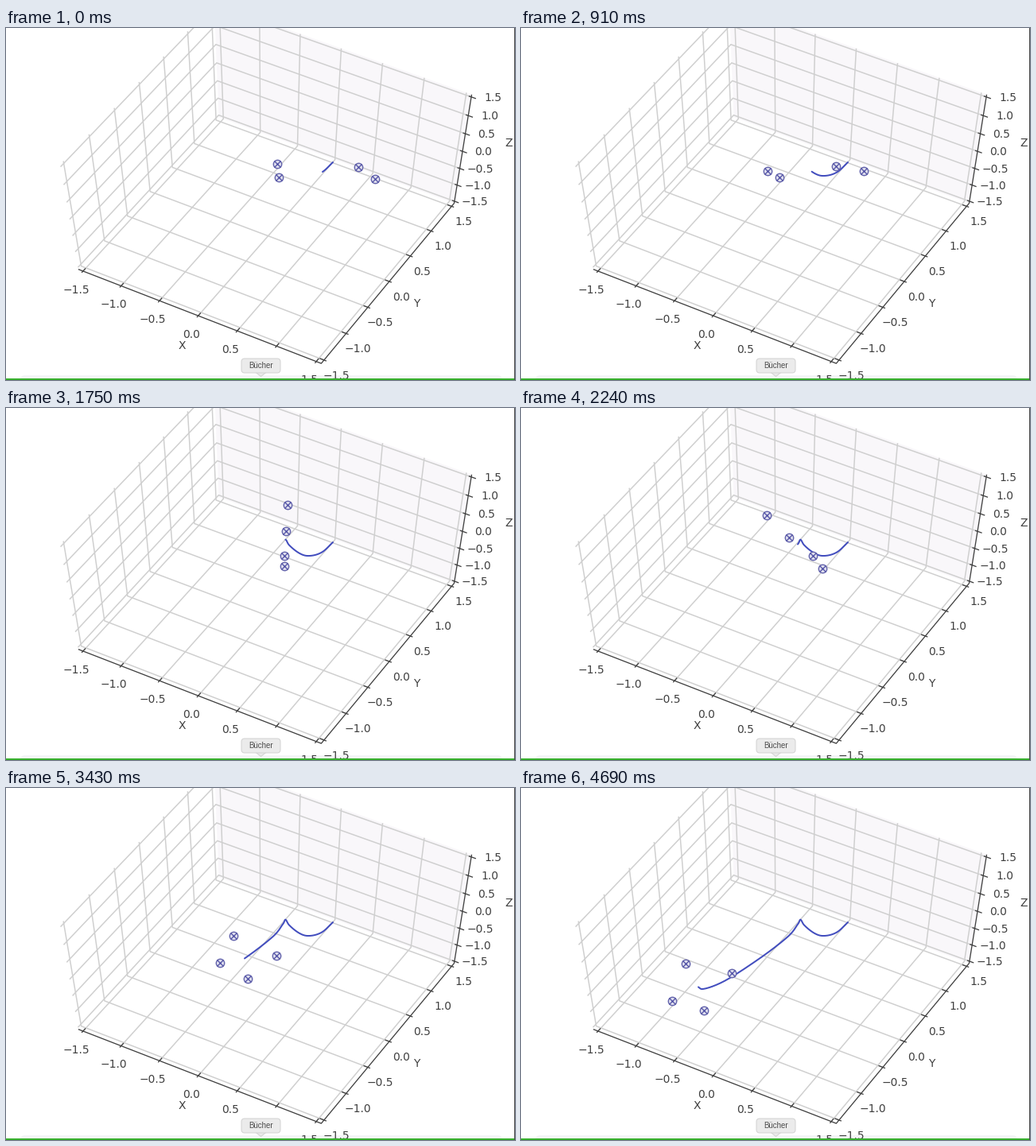
These frames come from a looping animation (640x443 px, 4760 ms). A matplotlib script:

```python
import numpy as np
import matplotlib.pyplot as plt
from matplotlib.animation import FuncAnimation
from matplotlib.patches import FancyBboxPatch, Polygon, Rectangle

W, H, DPI = 640, 443, 100
FRAMES, INTERVAL = 68, 70
PT = 72 / DPI
E = 1.5625  # pane position, just outside the limits
TICKS = np.linspace(-1.5, 1.5, 7)
GRID, INK, BLUE = "#cfcfcf", "#3f3f3f", "#424dbe"

fig = plt.figure(figsize=(W / DPI, H / DPI), dpi=DPI, facecolor="white")
ax = fig.add_axes([0, 0, 1, 1])
ax.set_xlim(0, W)
ax.set_ylim(H, 0)
ax.axis("off")


# --- camera ---
def fit_camera(points):
    """Perspective matrix from pairs of box point and screen point."""
    rows, rhs = [], []
    for (x, y, z), (u, v) in points:
        rows.append([x, y, z, 1, 0, 0, 0, 0, -u * x, -u * y, -u * z])
        rows.append([0, 0, 0, 0, x, y, z, 1, -v * x, -v * y, -v * z])
        rhs += [u, v]
    m = np.linalg.lstsq(np.array(rows, float), np.array(rhs, float), rcond=None)[0]
    return np.append(m, 1).reshape(3, 4)


CAMERA = fit_camera([
    ((-1.5, -E, -E), (97, 305)), ((0, -E, -E), (241.5, 362.5)),
    ((E, -1.5, -E), (400.5, 418)), ((E, 0, -E), (481.3, 319)),
    ((E, 1.5, -E), (560.5, 224.7)), ((E, E, 1.5), (584.5, 86)),
    ((-E, 0, -E), (181, 206)), ((-E, -1.5, E), (72, 168)),
    ((-E, 1, E), (228, 4)), ((-0.5, E, E), (371, 8)),
])


def project(*p):
    u, v, w = CAMERA @ np.array([*p, 1.0])
    return np.array([u / w, v / w])


def path(points, color, width, z):
    xy = np.array([project(*p) for p in points])
    ax.plot(xy[:, 0], xy[:, 1], color=color, lw=width * PT, zorder=z,
            solid_capstyle="butt", solid_joinstyle="round")


def label(xy, text, size=10.0, **kw):
    ax.text(xy[0], xy[1] + 0.7, text, fontsize=size, ha="center", va="center",
            **{"color": INK, "family": "DejaVu Sans", "zorder": 5, **kw})


def number(t):
    return f"{t:.1f}".replace("-", "\u2212")


# --- box ---
back = [(-E, E, -E), (E, E, -E), (E, E, E), (-E, E, E)]
ax.add_patch(Polygon([project(*p) for p in back], fc="#f9f7fa", ec="none", zorder=0))

for t in TICKS:
    path([(t, -E, -E), (t, E, -E), (t, E, E)], GRID, 1.5, 1)
    path([(E, t, -E), (-E, t, -E), (-E, t, E)], GRID, 1.5, 1)
    path([(-E, -E, t), (-E, E, t), (E, E, t)], GRID, 1.5, 1)
    path([(t, -E + 0.055, -E), (t, -E - 0.03, -E)], INK, 1.3, 2)
    path([(E - 0.055, t, -E), (E + 0.03, t, -E)], INK, 1.3, 2)
    path([(E - 0.03, E, t), (E + 0.055, E, t)], INK, 1.3, 2)
    label(project(t, -E, -E) + (-8.9, 23), number(t))
    label(project(E, t, -E) + (15, 19), number(t))
    label(project(E, E, t) + (26.3 + t / 2, 0.4), number(t))

path([(-E, -E, -E), (E, -E, -E), (E, E, -E), (E, E, E)], INK, 1.3, 2)

label((221, 399), "X")
label((516, 346.5), "Y")
label((632, 144), "Z")


# --- screen edges and dock tooltip ---
def panel(x, y, w, h, radius, **kw):
    style = f"round,pad=0,rounding_size={radius}"
    ax.add_patch(FancyBboxPatch((x, y), w, h, boxstyle=style, **kw))


panel(18, 437, 606, 20, 6, fc="#f5f5f8", ec="none", zorder=0.5)
ax.add_patch(Rectangle((0, 441.4), W, 1.6, fc="#38b02e", ec="none", zorder=8))
ax.add_patch(Rectangle((639, 0), 1, H, fc="#4a4a4a", ec="none", zorder=8))
tip = dict(fc="#ebebeb", ec="#d2d2d2", lw=PT, zorder=6)
ax.add_patch(Polygon([(314, 433.5), (327, 433.5), (320.5, 438.5)], **tip))
panel(296, 416, 49, 18, 4, **tip)
label((320.5, 424.6), "Bücher", 7.0, family="Liberation Sans", color="#4c4c4c", zorder=7)


# --- flight ---
def spline(keys, s):
    """Smooth curve through rows of (step, values...)."""
    keys = np.array(keys, float)
    t, val = keys[:, 0], keys[:, 1:]
    slope = np.gradient(val, t, axis=0)
    i = np.clip(np.searchsorted(t, s, side="right") - 1, 0, len(t) - 2)
    h = (t[i + 1] - t[i])[:, None]
    u = (s - t[i])[:, None] / h
    return (val[i] + (3 * u**2 - 2 * u**3) * (val[i + 1] - val[i])
            + h * u * (1 - u) * ((1 - u) * slope[i] - u * slope[i + 1]))


LEAD, LAST, FINE = 5, 62, 4  # steps flown before the loop, last step, samples per step

# Step and screen position of the body
BODY = [(-5, 411, 169), (0, 398, 181), (7, 378.5, 186), (17, 356, 172.5),
        (22, 352, 166), (30, 348, 171.5), (38, 334.5, 188), (45, 300, 214.5),
        (52, 254.7, 243.5), (58, 228.5, 253), (62, 223, 250.5)]

# Step and screen vectors of the two arms: level, flip over, level again
ARMS = [(0, 61.5, 9.5, 50, -6.5), (7, 59, 15, 49, -9.5), (17, 49.5, -20.5, 18, -6.5),
        (22, 9, -37, 4, -15), (30, -35, -33.5, -15, -11.5), (38, -19, -34.5, -9, -3),
        (44, -10, -27, -33, 3), (52, -3, -35, -42.5, 15.5), (62, -11.5, -29.5, -37.5, 17.5)]

steps = np.arange(0, LAST + 1)
body = spline(BODY, steps)
arm1, arm2 = np.hsplit(spline(ARMS, steps), 2)

# Perspective pulls the arms' midpoints apart
lean = arm1 + 2 * arm2
lean *= 5 / np.linalg.norm(lean, axis=1, keepdims=True)
ROTORS = np.stack([body + lean + arm1, body + lean - arm1,
                   body - lean + arm2, body - lean - arm2], axis=1)
TRAIL = spline(BODY, np.linspace(-LEAD, LAST, (LEAD + LAST) * FINE + 1))
HOLDS = (10, 18, 33, 48, 55)  # ticks on which the simulation stalls

trail, = ax.plot([], [], color=BLUE, lw=2 * PT, zorder=3, solid_capstyle="round")
rings, = ax.plot([], [], "o", ms=10.4 * PT, mfc="#e0e0ee", mec="#6464ac",
                 mew=1.4 * PT, zorder=4)
crosses, = ax.plot([], [], "x", ms=7.4 * PT, mec="#5252a6", mew=1.3 * PT, zorder=4.1)


def draw(n):
    step = n - sum(n >= hold for hold in HOLDS)
    for marks in (rings, crosses):
        marks.set_data(*ROTORS[step].T)
    trail.set_data(*TRAIL[:(step + LEAD) * FINE + 1].T)
    return trail, rings, crosses


anim = FuncAnimation(fig, draw, frames=FRAMES, interval=INTERVAL,
                     repeat=True, repeat_delay=0, blit=False)
plt.show()
```
